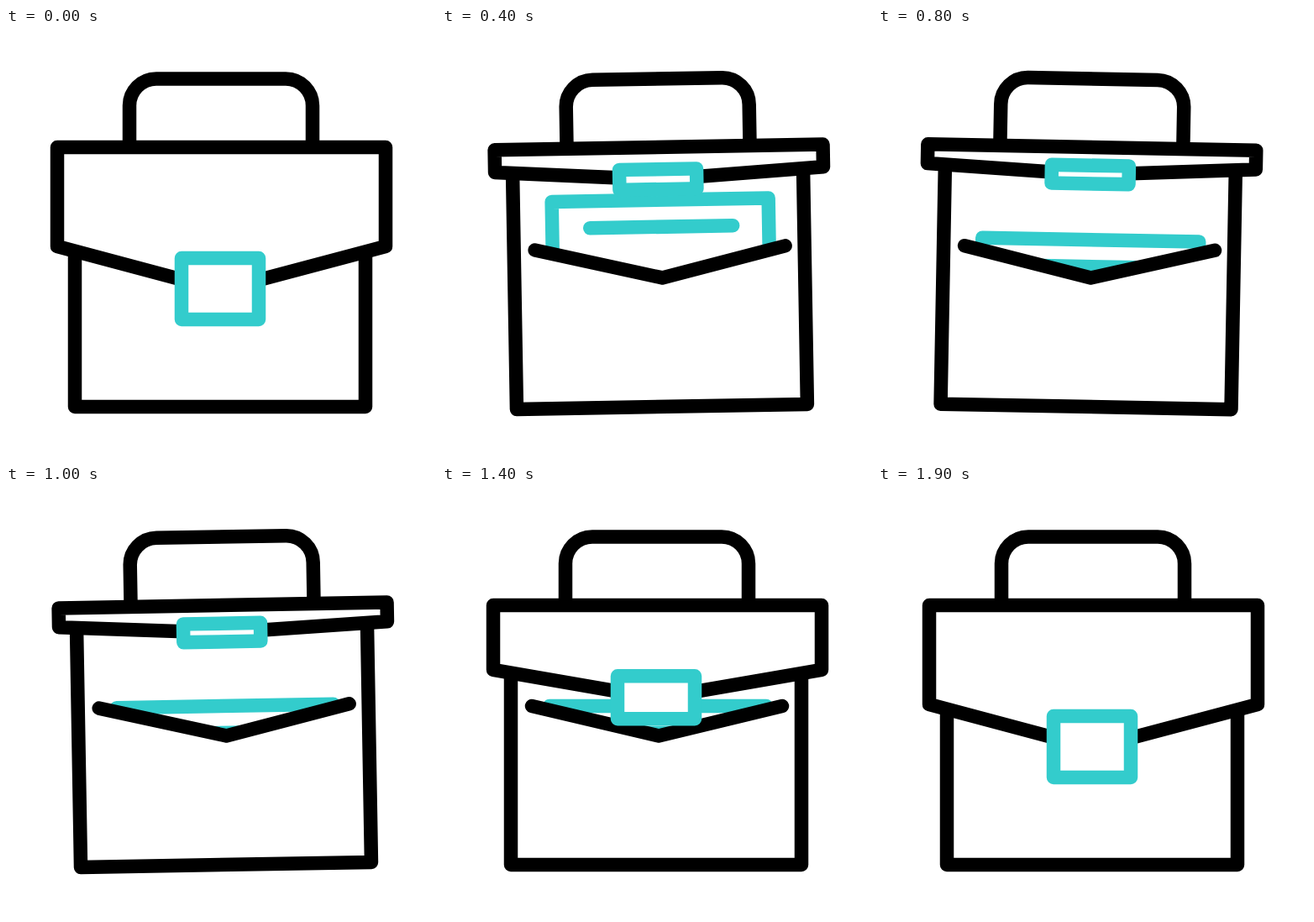
Animation of 512 by 512 pixels, one loop 2 s. Source, as an HTML page:

```html
<!DOCTYPE html>
<html lang="en">
<head>
<meta charset="utf-8">
<title>Briefcase</title>
<style>
  html, body { margin: 0; width: 100%; height: 100%; overflow: hidden; background: #fff; }
  svg { display: block; width: 100%; height: 100%; }
  path, rect { fill: none; stroke: #000; stroke-width: 16.5; stroke-linecap: round; stroke-linejoin: round; }
  .accent { stroke: #3cc; }
  .solid { fill: #fff; }
</style>
</head>
<body>
<svg viewBox="0 0 512 512">
  <clipPath id="abovePocket"><path d="M107 0V262L258 297.5L405 262V0Z"/></clipPath>
  <g id="bag">
    <path d="M82 150V451H428V150"/>
    <g clip-path="url(#abovePocket)">
      <g id="sheet">
        <path class="accent" d="M128 150V0H386V150"/>
        <path class="accent" d="M173 32H343"/>
      </g>
    </g>
    <path d="M107 262L258 297.5L405 262"/>
    <path d="M147 142V93A32 32 0 0 1 179 60.5H333A32 32 0 0 1 365 93V142"/>
    <path id="flap" class="solid"/>
    <rect id="clasp" class="accent solid" x="209" width="92"/>
  </g>
</svg>
<script>
  const LOOP = 2000, STEP = 100, FLAP_TOP = 142;
  const [bag, sheet, flap, clasp] =
    ['bag', 'sheet', 'flap', 'clasp'].map(id => document.getElementById(id));

  // Each track is a list of [time in ms, value].
  const swing = [[290, 0], [664, -5], [880, 3.7], [1030, -1.5], [1230, 0]];
  const sheetTop = [[100, 262], [500, 195], [560, 195], [880, 262]];
  const flapScale = [[0, 1], [460, 0.193], [1150, 0.193], [1610, 1]];

  function valueAt(track, time) {
    const next = track.findIndex(([t]) => t > time);
    if (next === 0) return track[0][1];
    if (next < 0) return track[track.length - 1][1];
    const [t0, v0] = track[next - 1], [t1, v1] = track[next];
    const eased = (1 - Math.cos(Math.PI * (time - t0) / (t1 - t0))) / 2;
    return v0 + (v1 - v0) * eased;
  }

  function draw(now) {
    const time = Math.floor(now % LOOP / STEP) * STEP;
    const scale = valueAt(flapScale, time);
    const side = FLAP_TOP + 118 * scale;
    const tip = FLAP_TOP + 170 * scale;
    const claspHeight = 9.5 + 63.5 * scale;

    bag.setAttribute('transform', `rotate(${valueAt(swing, time)} 256 52)`);
    sheet.setAttribute('transform', `translate(0 ${valueAt(sheetTop, time)})`);
    flap.setAttribute('d', `M61 ${FLAP_TOP}H452V${side}L256 ${tip}L61 ${side}Z`);
    clasp.setAttribute('y', FLAP_TOP + 168.5 * scale - claspHeight / 2);
    clasp.setAttribute('height', claspHeight);
  }

  const start = performance.now();
  function tick() {
    draw(performance.now() - start);
    requestAnimationFrame(tick);
  }
  tick();
</script>
</body>
</html>
```
